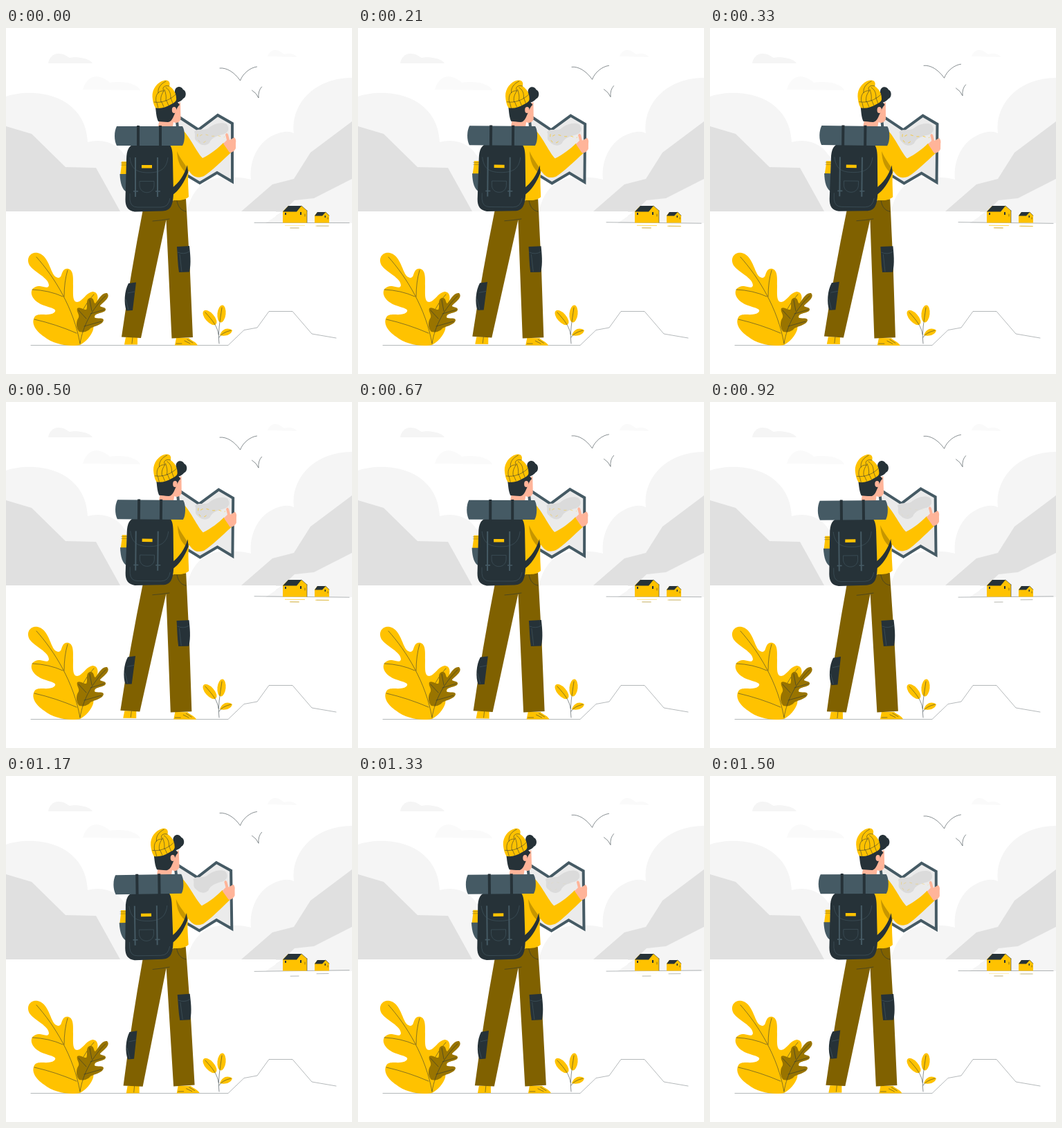
Animation, 500 px wide and 500 px high, one loop 1.54 s. Source, as an HTML page:

```html
<!DOCTYPE html>
<html lang="en">
<head>
<meta charset="utf-8">
<title>Hiker with a map</title>
<style>
html, body { margin: 0; width: 100%; height: 100%; overflow: hidden; background: #fff; }
svg { display: block; width: 100vw; height: 100vh; }
.cloud { fill: #f5f5f5; }
.mist { fill: #fafafa; }
.hill { fill: #e0e0e0; }
.sun { fill: #ffc200; }
.olive { fill: #806100; }
.ink { fill: #263238; }
.slate { fill: #455a64; }
.skin { fill: #ffb499; }
.pen { fill: none; stroke: #263238; stroke-width: .55; stroke-linecap: round; stroke-linejoin: round; }
.hair { stroke-width: .35; }
.seam { fill: none; stroke: #455a64; stroke-width: .6; }
.glow { fill: none; stroke: #ffc200; stroke-width: .7; }
</style>
</head>
<body>
<svg viewBox="0 0 500 500">
  <path class="cloud" d="M61 51C62 44 67 37 76 37C84 37 88 41 92 43C100 41 120 43 125 51Z"/>
  <path class="mist" d="M111 89C114 79 120 70 131 70C140 71 146 75 150 79C165 76 190 79 194 90ZM378 41C380 35 385 31 391 32C396 33 399 36 402 38C408 36 418 37 420 42Z"/>
  <path class="cloud" d="M0 99C20 92 50 91 76 102C104 115 117 138 118 165C135 160 158 164 170 182L240 265H262C267 236 286 217 312 216C330 215 345 216 354 219C351 190 366 156 402 150Q410 149 416 152C411 112 444 72 500 72V265H0Z"/>
  <path class="hill" d="M0 142L37 153L86 201L130 202L165 265H0Z"/>
  <path class="hill" d="M340 265L385 226L416 218L440 180L500 135V282H390V265Z"/>
  <path class="cloud" d="M375 282L400 265L417 249L445 246L500 218V282Z"/>
  <path fill="#fff" d="M340 265.500H399L375 282H340Z"/>

  <g id="shore">
    <path class="pen hair" d="M359 281.500H496M411 289H423M449 286H466"/>
    <path class="glow fade" d="M403 285.500H432M410 289H424M447 286H467"/>
  </g>
  <path class="sun" d="M400 265L408 257H427L435 264V281.500H400ZM446 271L450 266H462L467 271V281.500H446Z"/>
  <path class="ink" d="M400 265.500L408 257H427L420 265.500ZM446 271.500L450 266H462L457 271.500ZM403 267H405V270H403ZM425 266H427V270H425ZM460.500 271H462V274H460.500Z"/>
  <path class="pen" d="M427 257L435 264M435 264V281M462 266L467 271M432 269V272M465 274V276"/>

  <path id="birdA" class="pen" d="M309 58C319 57 330 64 338.500 76C342 66 353 57 362.500 56"/>
  <path id="birdB" class="pen" d="M355.500 90Q362 94 365 101Q364 91 369.500 85"/>

  <path class="pen hair" d="M36 458.500H321L344 436.500L363 433L380 409.500H414L442 442L477 448"/>

  <path class="sun" d="M107 458C92 461 68 457 55 446C43 438 36 427 41 418C46 410 61 418 70 411C78 403 50 405 40 391C33 381 38 373 49 373C55 374 61 377 62 372C62 361 41 353 34 343C28 331 37 323 46 325C58 328 62 342 67 353C70 361 78 364 80 357C82 351 84 347 90 348C98 350 97 362 97 372C97 385 96 396 103 396C111 395 115 383 125 381C133 381 134 390 131 397L126 436C123 445 116 453 107 458Z"/>
  <path class="pen" d="M44 331C70 360 98 405 107 456M38 378Q62 379 82 388M89 350Q84 367 84 388M41 421Q72 428 102 441M127 385Q109 403 104 430"/>
  <path fill="#997400" d="M106 439C101 434 101 425 104 420C108 415 101 410 103 405C107 402 113 408 116 407C119 403 114 393 121 390C128 389 126 397 129 398C133 394 138 382 146 383C151 388 144 394 137 400C133 404 142 402 144 406C145 412 131 411 128 416C125 422 140 417 141 422C140 429 127 431 122 434C117 440 110 440 106 439Z"/>
  <path class="pen" d="M144 387C125 405 111 430 107 456M105 408L116 420M121 393L124 409M142 407L122 413M138 424L113 431"/>

  <g class="sun">
    <ellipse cx="311.500" cy="413" rx="6" ry="12.500" transform="rotate(6 311.500 413)"/>
    <ellipse cx="294.500" cy="418.500" rx="6.500" ry="13" transform="rotate(-42 294.500 418.500)"/>
    <path d="M309 444C312 435 320 432 327 437C325 444 316 446 309 444Z"/>
  </g>
  <path class="pen" d="M312 404C309 425 306 440 308 456M288 411C299 423 306 432 307 443M325 437Q312 440 308 447"/>

  <g id="hiker">
    <path d="M246 126L278 147L306 126L327 138V222L305 209L280 224L255 209Z" fill="#ebebeb" stroke="#455a64" stroke-width="4"/>
    <path d="M272 150C276 144 285 149 292 145C300 138 312 135 319 139C325 147 319 153 312 154C306 156 297 158 294 166C288 172 280 169 276 164C270 160 275 155 272 150Z" fill="#dbdbdb"/>
    <path class="glow fade" stroke-dasharray="4 5" d="M277 153C275 165 284 169 289 163M280 156C288 150 293 158 302 156S312 161 316 157"/>

    <path class="sun" d="M173 447H190V457.500H171ZM246 448H264C268 452 274 453 277 458.500H244Z"/>
    <path class="pen" d="M183 447L182 456M258 452L266 456M262 450L270 455M246 456H254"/>
    <path class="olive" d="M198 262L246 248L260 247C261 262 263 300 265 330L270 447L239.500 448.500L231.500 277L195 448L167 446.500Q180 355 198 262Z"/>
    <path class="pen" d="M212 279Q225 278 236 276M247 250C249 260 254 264 260 265"/>
    <path class="ink" d="M247 316L265 315C266 325 268 340 265 352.500L250 353C248 340 248 328 247 316ZM188 367.500L183 408L174 408.500C170 398 171 380 177 369Z"/>
    <path class="seam" d="M248 324Q257 328 265 323M251 327L254 352M176 383L186 381M173 392L177 407"/>

    <path class="skin" d="M241 113L252 107L252.500 131C251 137 246 138 242 136L240 148H219L222 130Z"/>
    <path class="sun" d="M238 148H256C266 158 276 180 284 188C296 182 306 174 314 166C320 169 323 174 325 180C312 192 296 208 286 214C276 218 270 215 264 206C262 218 264 235 264 244C258 249 252 249 246 249H225V160Z"/>
    <path fill="#806100" opacity=".45" d="M247 178C252 190 260 198 264 206L262 211C252 202 248 194 247 178Z"/>
    <path class="ink" d="M262 198L263 209C258 222 250 236 239 242V232C250 224 258 212 262 198Z"/>
    <path class="skin" d="M314 167L319 162L317 154Q319 150 321 154L323 162L330 158Q333 161 332 166L332 174Q329 180 323 180Z"/>

    <path class="sun" d="M167 193H174V213H165L167 198Z"/>
    <path class="pen hair" d="M166 195H174M166 198H174"/>
    <path class="slate" d="M164.500 211H175V237C168 235 165 224 164.500 211Z"/>
    <path class="ink" d="M186 168H236C240 172 241 180 241 190L242 240C241 257 238 264 226 264.500L186 265.500C176 264 172.500 258 172.500 248L174 190C174 176 178 169 186 168Z"/>
    <path class="seam" d="M179 187C181 204 189 209 206 209C223 209 232 204 234 187M193 221.500H214V228C213 241 194 241 193 228ZM179 239V248Q180 259 190 259H224Q235 259 237 246"/>
    <path class="seam" d="M187 187V244M219 187V244" style="stroke-width:2"/>
    <path class="seam" d="M184 236H191M216 236H223" style="stroke-width:1.600"/>
    <rect class="sun" x="196" y="198" width="15" height="4.500"/>

    <path class="slate" d="M160 142H255Q258 147 258 156T255 170H160Q157 164 157 156T160 142Z"/>
    <path class="ink" d="M189 141H193V172H189ZM221 141H225V172H221Z"/>

    <path class="ink" d="M216 115C226 116 236 110 246 105L251 111C247 114 245 122 242 128C240 133 237 136 234 136C228 136 224 135 220 135C217 128 217 122 216 115Z"/>
    <path class="ink" d="M244 91C245 84 253 83 256 89C261 91 261 100 256 102C253 106 248 108 244 108Z"/>
    <ellipse class="skin" cx="243" cy="118.500" rx="3.200" ry="4.500"/>
    <path class="sun" d="M211.500 99C211 88 219 78 228 76C235 74 238 79 236 84C242 88 246 94 246 101C247 106 243 108 239 110C231 115 223 117 216 115.500C213 111 212 105 211.500 99Z"/>
    <path class="pen" d="M214 107C224 109 238 104 245 96M236 84C229 82 225 86 228 91C220 90 215 97 217 107M231 77C223 81 219 87 220 94M228 91C224 97 223 101 224 107M229 89C231 95 232 99 231 105M231 86C237 90 238 95 238 101M218 108L220 116M225 107L228 114M232 105L235 112M238 101L241 109"/>
  </g>
</svg>
<script>
const LOOP = 1540, TURN = Math.PI * 2;
const SWAY = .75, PEAK = 355;
const $ = id => document.getElementById(id);
const move = (id, value) => $(id).setAttribute('transform', value);
const fades = document.querySelectorAll('.fade');
const swayAt = t => Math.cos(TURN * (t - PEAK) / LOOP);
const rest = swayAt(0);

function draw(now) {
  const t = now % LOOP, s = swayAt(t);
  const lift = (1 - Math.cos(TURN * t / LOOP)) / 2;
  move('hiker', `rotate(${SWAY * (s - rest)} 243 267)`);
  move('shore', `rotate(${SWAY * s} 428 281.5)`);
  move('birdA', `translate(0 ${-9.5 * lift})`);
  move('birdB', `translate(0 ${-8 * lift})`);
  for (const el of fades) el.style.opacity = Math.max(0, .45 + .55 * s);
}

const start = performance.now();
function tick() {
  draw(performance.now() - start);
  requestAnimationFrame(tick);
}
draw(0);
requestAnimationFrame(tick);
</script>
</body>
</html>
```
